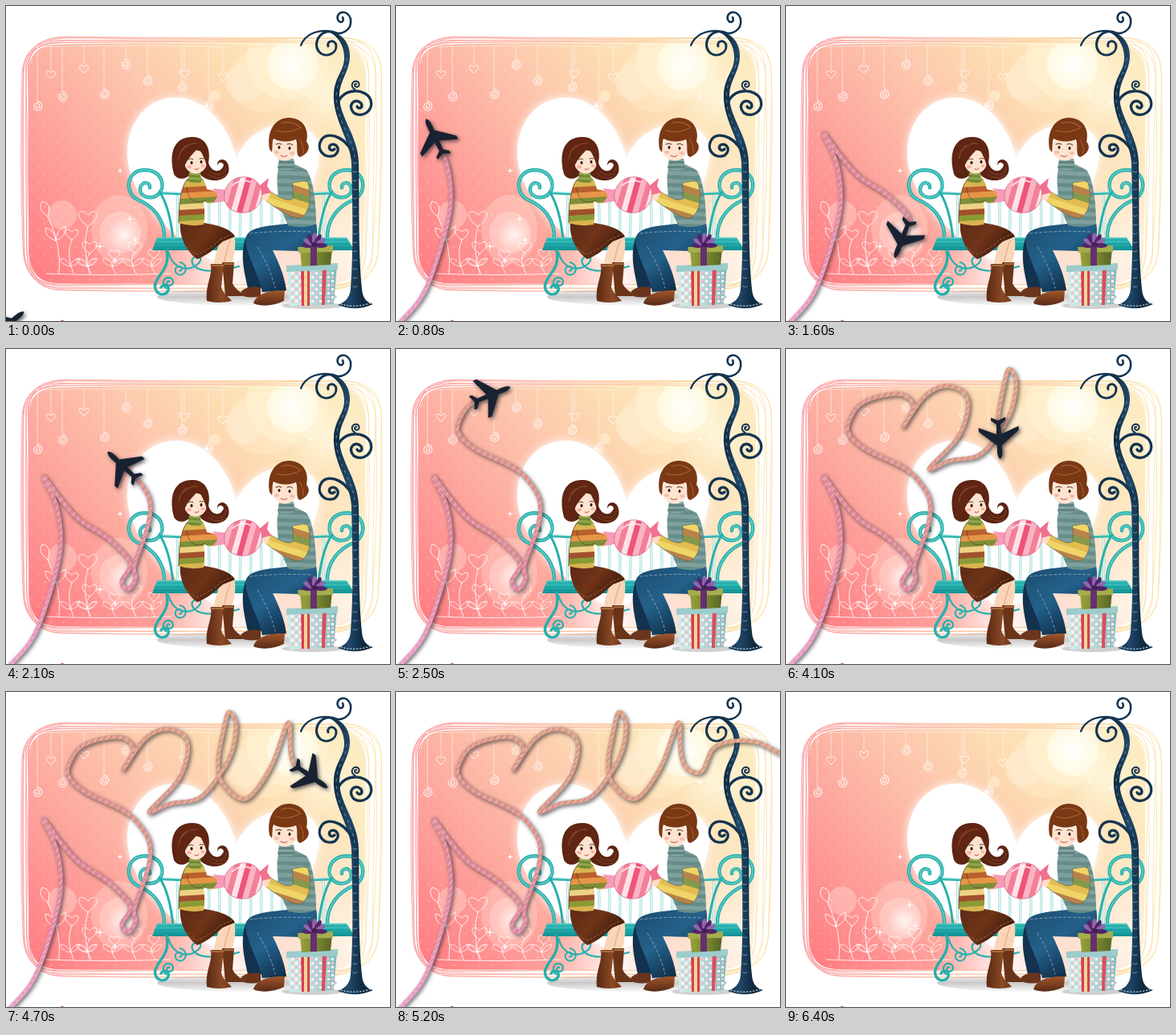
An HTML page with a canvas for the animation above (8.4 s loop, 478 by 392 pixels).

```html
<!DOCTYPE html>
<html lang="en">
<head>
<meta charset="utf-8">
<title>Bench and plane</title>
<style>
html, body { margin: 0; width: 100%; height: 100%; overflow: hidden; background: #fff; }
canvas { display: block; width: 478px; height: 392px; }
</style>
</head>
<body>
<canvas id="stage" width="478" height="392"></canvas>
<script>
const W = 478, H = 392, LOOP = 8400, STEP = 100;
const view = document.getElementById('stage').getContext('2d');
const scene = document.createElement('canvas');
const rope = document.createElement('canvas');
scene.width = rope.width = W;
scene.height = rope.height = H;
let c = scene.getContext('2d');

function fill(d, color) {
  c.fillStyle = color;
  c.fill(new Path2D(d));
}
function line(d, color, w = 1, dash = []) {
  c.strokeStyle = color;
  c.lineWidth = w;
  c.lineCap = c.lineJoin = 'round';
  c.setLineDash(dash);
  c.stroke(new Path2D(d));
  c.setLineDash([]);
}
function oval(x, y, rx, ry, color, rot = 0) {
  c.fillStyle = color;
  c.beginPath();
  c.ellipse(x, y, rx, ry, rot, 0, Math.PI * 2);
  c.fill();
}
function glow(x, y, r, inner, outer) {
  const g = c.createRadialGradient(x, y, 0, x, y, r);
  g.addColorStop(0, inner);
  g.addColorStop(1, outer);
  oval(x, y, r, r, g);
}
function ramp(x0, y0, x1, y1, colors) {
  const g = c.createLinearGradient(x0, y0, x1, y1);
  colors.forEach((k, i) => g.addColorStop(i / (colors.length - 1), k));
  return g;
}
// Spiral from the rim at angle a inward; dir sets the sense.
function spiral(x, y, r, a, turns, dir, color, w) {
  let d = '';
  for (let i = 0; i <= 40; i++) {
    const k = i / 40, q = a + dir * k * turns * Math.PI * 2, s = r * (1 - 0.85 * k);
    d += (i ? 'L' : 'M') + (x + s * Math.cos(q)) + ',' + (y + s * Math.sin(q));
  }
  line(d, color, w);
}
function heart(x, y, s, color) {
  line(`M${x},${y + s} C${x - s * 2},${y - s * .3} ${x - s},${y - s * 1.5} ${x},${y - s * .4}
    C${x + s},${y - s * 1.5} ${x + s * 2},${y - s * .3} ${x},${y + s}`, color, 1);
}
function clipTo(d, draw) {
  c.save();
  c.clip(new Path2D(d));
  draw();
  c.restore();
}
function bands(d, colors, x, y, angle, size) {
  clipTo(d, () => {
    c.translate(x, y);
    c.rotate(angle);
    for (let i = 0; i < 16; i++) {
      c.fillStyle = colors[i % colors.length];
      c.fillRect(-60, i * size, 120, size + .5);
    }
  });
}

const panel = 'M62,48 C150,45 310,47 412,47 C438,50 447,66 447,92 C446,170 449,240 444,305 C440,335 428,345 400,345 C300,347 160,346 64,345 C40,344 30,332 29,306 C27,230 27,160 28,82 C29,60 40,49 62,48Z';

function drawPanel() {
  c.fillStyle = '#fff';
  c.fillRect(0, 0, W, H);
  const edge = ramp(20, 0, 460, 0, ['#fb8f94', '#fcb09c', '#fbc98e', '#fbe0a0']);
  for (let i = 0; i < 7; i++) {
    const j = n => Math.sin(i * 2.7 + n * 1.9) * 4;
    const l = 24 + j(1), r = 458 + 2.6 * j(2), t = 42 + j(3), b = 350 + j(4);
    line(`M${l + 45},${t} Q250,${t + j(5)} ${r - 42},${t + 1} Q${r},${t + 3} ${r},${t + 45}
      Q${r + j(6)},200 ${r - 4},${b - 42} Q${r - 8},${b} ${r - 54},${b}
      Q230,${b + j(7)} ${l + 44},${b} Q${l + 2},${b} ${l + 1},${b - 45}
      Q${l + j(8)},190 ${l},${t + 40} Q${l},${t + 2} ${l + 45},${t}`, edge, .8);
  }
  fill(panel, ramp(50, 340, 370, 70, ['#ff7f84', '#fe9896', '#fdb0a2', '#fdc8ad', '#fddcb2', '#fdebc2']));
  clipTo(panel, () => {
    for (let y = 50, n = 0; y < 345; y += 10, n++)
      for (let x = 32 + n % 2 * 8; x < 300; x += 16) oval(x, y, 1.5, 1.5, 'rgba(255,225,205,.22)');
    glow(430, 320, 150, 'rgba(255,255,250,.75)', 'rgba(255,255,250,0)');
    glow(280, 345, 95, 'rgba(255,255,255,.9)', 'rgba(255,255,255,0)');
    oval(350, 66, 51, 51, 'rgba(255,246,214,.5)');
    oval(322, 92, 45, 40, 'rgba(255,246,220,.25)');
    oval(296, 95, 23, 23, 'rgba(255,240,215,.5)');
    oval(260, 112, 7, 7, 'rgba(255,245,215,.55)');
    oval(357, 73, 32, 32, 'rgba(255,255,240,.5)');
    glow(357, 73, 33, 'rgba(255,255,255,1)', 'rgba(255,255,245,.1)');
    glow(395, 110, 45, 'rgba(255,255,240,.5)', 'rgba(255,255,240,0)');
  });
  c.save();
  c.shadowColor = '#fff';
  c.shadowBlur = 12;
  fill('M287,190 C276,145 246,114 211,114 C172,115 150,148 151,186 C154,238 205,289 272,325 C330,300 386,245 390,184 C391,158 370,146 348,147 C318,149 296,166 287,190Z', '#fff');
  c.restore();
}

function drawOrnaments() {
  const white = 'rgba(255,255,255,.85)';
  line('M35,51 Q150,48 275,51', 'rgba(255,255,255,.5)', .8);
  const hung = [[39, 125, 0], [56, 85, 1], [70, 113, 0], [97, 78, 1], [122, 110, 0], [149, 73, 0],
    [176, 93, 0], [222, 84, 1], [219, 101, 0], [252, 124, 0], [270, 88, 1]];
  for (const [x, y, kind] of hung) {
    line(`M${x},50 L${x},${y - 5}`, 'rgba(255,255,255,.6)', .9);
    if (kind) heart(x, y, 5, white);
    else spiral(x, y, 6.5, -Math.PI / 2, 2, 1, white, 1.1);
  }
  oval(70, 260, 18, 18, 'rgba(255,225,215,.38)');
  oval(141, 278, 35, 43, 'rgba(255,235,225,.28)');
  oval(142, 282, 26, 26, 'rgba(255,240,230,.3)');
  glow(147, 285, 22, 'rgba(255,255,255,.8)', 'rgba(255,255,255,0)');
  line('M50,333 Q120,336 205,333', white, 1);
  for (const [x, y, s] of [[82, 284, 7], [102, 264, 10], [104, 300, 8], [135, 309, 6], [160, 300, 7], [184, 308, 6]]) {
    line(`M${x},${y + s} Q${x - 8},${(y + 333) / 2} ${x + 2},333`, white, 1);
    heart(x, y, s, white);
    line(`M${x - 2},324 q-13,-2 -12,-10 q10,1 12,10 q10,-2 12,-10 q-9,0 -12,10`, white, .8);
  }
  line('M66,333 Q70,300 52,262 M62,292 q-14,-4 -13,-16 q12,2 13,16 q14,-6 12,-18 q-11,4 -12,18', white, 1);
  oval(49, 250, 0, 0, white);
  line('M52,262 q-14,-9 -7,-19 q13,2 7,19', white, 1);
  for (const [x, y, s] of [[117, 299, 5], [154, 265, 4], [136, 317, 3], [142, 205, 3], [161, 291, 4], [250, 124, 4], [405, 120, 4], [378, 112, 3]]) {
    line(`M${x - s},${y} h${s * 2} M${x},${y - s} v${s * 2}`, '#fff', .8);
    oval(x, y, 1.5, 1.5, '#fff');
  }
}

const TEAL = '#25b0ac', AQUA = '#62cbc5';
function drawArm() {
  const d = 'M197,292 C199,264 181,248 164,241 C147,233 149,205 172,204 C193,204 200,223 190,234 C181,242 166,238 167,227 C169,217 180,219 179,226';
  line(d, TEAL, 4.5);
  line(d, AQUA, 1.6);
  line('M191,231 C201,246 206,270 208,291', TEAL, 3);
}
function drawBench() {
  const shadow = ramp(0, 350, 0, 374, ['rgba(150,145,145,0)', 'rgba(150,145,145,.5)', 'rgba(150,145,145,0)']);
  oval(300, 362, 112, 11, shadow);
  for (let x = 213; x < 405; x += 13) {
    line(`M${x},236 Q${x + 2},264 ${x},289`, '#8fd6d2', 3);
    line(`M${x},236 Q${x + 2},264 ${x},289`, '#f4fcfb', 1.4);
  }
  line('M192,233 C225,232 245,239 299,236 C350,239 376,232 405,233', TEAL, 3);
  line('M194,232 C225,231 245,238 299,235 C350,238 376,231 404,232', '#92ddd7', 1.2);
  drawArm();
  c.save();
  c.translate(597, 0);
  c.scale(-1, 1);
  drawArm();
  c.restore();
  fill('M188,288 L424,288 L434,304 L182,304Z', ramp(0, 288, 0, 304, ['#4cc9c3', '#22b0ac', '#128f94']));
  line('M188,291 H424 M185,296 H428 M184,300 H430', '#188f96', .9);
  line('M200,304 C204,324 193,331 188,341 C181,353 191,363 200,357 C207,350 197,343 193,350', TEAL, 3.5);
  line('M202,306 C207,326 226,333 240,320 C249,309 228,309 232,320 C238,333 265,331 290,324', TEAL, 2.2);
  spiral(216, 328, 9, -1.5, 1.5, 1, TEAL, 2);
  spiral(203, 344, 8, 2, 1.5, 1, TEAL, 2.2);
}

const KNIT = ['#8a9a35', '#d9b44f', '#b9602d', '#e69646', '#7e8f38', '#efd185', '#a1502d'];
function drawGirl() {
  fill('M209,209 C201,178 213,162 233,163 C251,164 255,181 252,195 C256,208 268,208 271,198 C269,192 262,195 264,200 C260,191 272,187 276,196 C281,208 273,218 257,217 C246,216 241,209 238,205 L225,213 C219,217 211,214 209,209Z', '#5b2413');
  line('M254,206 C262,213 273,211 274,201 M251,209 C260,216 269,215 273,210', '#85452a', 1);
  fill('M258,323 C261,308 264,298 268,290 L284,284 C287,299 284,312 281,321Z', '#fbd5b8');
  line('M271,322 C273,310 276,300 279,292', '#d99b7c', .9);
  fill('M217,268 C215,287 224,305 238,315 C250,311 262,300 270,293 L285,287 C281,277 260,272 247,270Z', ramp(215, 275, 265, 316, ['#5d2a16', '#703418', '#3c1a0c']));
  line('M225,300 Q232,308 239,309 Q256,301 266,291 L281,284', '#a16c42', 1, [2, 3]);
  const boot = ramp(252, 0, 286, 0, ['#5f2d14', '#8a4a26', '#622d14']);
  fill('M269,319 L284,319 L282,345 C285,353 293,355 295,361 L273,361Z', '#6a3418');
  fill('M255,321 L271,321 L268,350 C270,358 277,362 281,367 Q265,371 250,367 C248,346 257,338 255,321Z', boot);
  line('M255,323 L271,323 M272,321 L283,321', '#a86c3f', 2);
  const body = 'M229,213 C218,219 215,245 215,270 Q229,275 246,272 C248,260 247,251 246,243 L254,246 L269,243 L268,232 L250,228 C248,219 245,214 242,213Z';
  bands(body, KNIT, 230, 211, -.06, 7);
  line('M225,226 C226,240 235,248 248,242', 'rgba(80,45,20,.55)', 1);
  line('M229,213 C218,219 215,245 215,270', '#694024', .8);
  bands('M228,207 L242,207 L243,219 Q234,222 227,218Z', ['#91a64a', '#718836'], 230, 207, .05, 3);
  oval(236, 194, 14, 14.5, '#fee4d0');
  fill('M211,206 C207,181 214,165 231,164 C247,162 254,177 250,200 C248,190 243,183 240,175 C234,184 223,190 220,208 L212,211Z', '#612613');
  line('M219,180 Q229,169 238,171 M215,190 Q218,176 225,173', '#93512f', 1);
  oval(231, 195, 1.6, 2.1, '#2b1713');
  oval(243, 194, 1.5, 2.1, '#2b1713');
  line('M227,191 q4,-2 6,0 M241,190 q3,-1 5,0', '#4c2519', .9);
  oval(228, 200, 3, 2, 'rgba(248,125,120,.5)');
  oval(245, 199, 2.5, 2, 'rgba(248,125,120,.5)');
  line('M235,203 q3,2 5,-1', '#c83c3b', 1);
  fill('M263,231 C270,228 279,233 280,237 C277,242 270,245 264,241Z', '#fee0cb');
}

function drawCandy() {
  fill('M278,229 L257,227 L264,236 L258,245 L279,242Z', '#f69ab5');
  fill('M313,226 L327,214 L325,224 L330,232 L315,236Z', '#f2708f');
  const body = 'M272,233 C275,215 294,208 309,216 C324,227 321,249 303,256 C286,261 269,251 272,233Z';
  bands(body, ['#f9b4c4', '#f37f98', '#ffe1e8', '#ee5578'], 272, 232, -1.3, 7);
  line(body, '#d8658a', .8);
  line('M282,223 Q293,214 304,219', 'rgba(255,255,255,.7)', 2);
}

function drawBoy() {
  fill('M298,289 C291,310 297,332 301,351 L325,351 L321,300Z', '#12324e');
  fill('M350,271 L386,270 C390,289 383,304 367,305 L332,304 C341,322 347,338 349,354 L319,356 C314,332 300,312 298,292 C298,274 326,274 350,271Z', ramp(300, 280, 350, 350, ['#1d5074', '#24618a', '#102f4b']));
  line('M304,283 Q340,279 380,281 M313,300 Q329,326 335,351', '#89a9bd', .9, [3, 3]);
  fill('M291,359 C293,351 304,348 317,350 L317,361 Q302,365 291,359Z', '#6b351d');
  fill('M308,370 C310,360 325,353 347,354 L346,367 C332,374 317,374 308,370Z', ramp(0, 354, 0, 372, ['#a1562b', '#5b2c18']));
  const torso = 'M341,199 C335,208 338,231 341,250 L351,273 Q370,278 386,271 C386,248 383,216 374,204 L358,196Z';
  bands(torso, ['#7fa09c', '#668d8a'], 360, 196, .04, 5);
  const sleeve = 'M357,220 L375,217 C382,238 378,258 366,264 C352,264 337,252 322,241 L328,230 C340,238 350,244 357,240Z';
  bands(sleeve, ['#f0d566', '#b9824a', '#86994b', '#e4bd50'], 357, 214, .3, 8);
  line(sleeve, 'rgba(70,80,50,.6)', .8);
  fill('M310,224 C318,222 327,228 329,235 L324,243 C317,240 309,234 308,229Z', '#fedec7');
  line('M311,226 l-7,-5 M310,230 l-7,-2 M312,235 l-6,0', '#fedec7', 2.6);
  bands('M340,191 L358,190 L360,202 Q349,207 338,202Z', ['#83a4a0', '#608380'], 348, 190, 0, 3);
  oval(347, 177, 15.5, 15.5, '#fee4d0');
  fill('M328,178 C324,154 336,139 352,139 C369,139 378,153 374,169 C379,174 378,183 366,188 C360,186 364,175 361,166 C350,170 340,169 333,165 C331,170 332,177 331,182Z', '#7a3814');
  line('M336,155 Q350,160 367,151 M343,146 Q354,142 366,150 M366,166 Q371,175 370,183', '#a6602f', 1.1);
  oval(340, 176, 1.5, 2.1, '#291713');
  oval(353, 177, 1.5, 2.1, '#291713');
  line('M336,172 q4,-2 7,0 M350,172 q4,-2 7,1', '#54291a', 1);
  oval(337, 182, 3, 2, 'rgba(246,130,115,.42)');
  oval(356, 183, 3, 2, 'rgba(246,130,115,.42)');
  line('M342,186 q5,3 8,0', '#b64038', 1);
}

function drawGifts() {
  oval(382, 373, 39, 4, 'rgba(120,120,125,.35)');
  fill('M350,325 L412,323 L408,371 L353,374Z', ramp(350, 0, 412, 0, ['#d2ecea', '#b8dedd', '#80babd']));
  for (let x = 355; x < 408; x += 5)
    for (let y = 331; y < 369; y += 5) {
      c.fillStyle = (x + y) % 2 ? '#f5b9c6' : '#f9fbf4';
      c.fillRect(x, y, 3, 3);
    }
  fill('M367,324 H378 V373 H368Z', '#d93f48');
  fill('M371,324 H375 V373 H371Z', '#f6d59a');
  fill('M394,324 L399,324 L397,372 L393,372Z', '#d94e5d');
  fill('M349,323 L413,320 L413,328 L349,331Z', '#9ccccb');
  fill('M366,304 L406,302 L404,322 L368,324Z', ramp(364, 0, 408, 0, ['#9aa33c', '#7b8830', '#546325']));
  fill('M363,300 L407,298 L407,306 L364,307Z', '#a5ad4d');
  fill('M379,300 H387 V323 H379Z', '#66306f');
  for (let i = 0; i < 7; i++) {
    const q = Math.PI + i * Math.PI / 6;
    oval(384 + 8 * Math.cos(q), 298 + 8 * Math.sin(q), 8, 3, i % 2 ? '#9165ad' : '#522469', q);
  }
  oval(384, 297, 4, 3, '#451f57');
}

function drawLamp() {
  const navy = '#143450';
  fill('M429,352 C433,300 431,240 430,195 C428,165 406,140 408,108 C410,86 422,80 421,62 C420,48 414,38 400,31 C418,32 429,47 428,64 C427,82 416,92 415,110 C414,138 438,160 439,195 C440,240 438,300 443,352 C444,364 449,369 457,371 Q435,381 413,372 C421,369 428,364 429,352Z', ramp(410, 0, 444, 0, ['#122d45', '#20486a', '#102a40']));
  line('M417,371 Q435,376 453,370', '#a6bac4', 1.5, [1, 3]);
  line('M367,49 C372,36 385,30 402,31', navy, 2.2);
  line('M412,34 C393,25 381,45 389,56 C396,66 412,60 411,49 C409,41 399,43 401,50', navy, 3);
  line('M404,32 C418,38 431,30 429,16 C425,3 410,7 413,17 C416,23 422,19 419,14', navy, 2.6);
  line('M413,122 C417,102 448,101 454,117 C458,130 444,140 433,133 C424,124 434,113 442,121 C445,127 439,129 437,125', navy, 3.4);
  line('M433,190 C428,165 402,154 393,166 C385,178 396,191 409,186 C419,178 409,168 403,174 C401,179 406,181 409,178', navy, 3.4);
  spiral(436, 98, 6, 1.8, 1.5, 1, navy, 2);
  for (let y = 195; y < 350; y += 11) line(`M432,${y} q3,2 5,0`, '#7f9dac', .9);
  line('M434,188 C431,162 411,142 411,112 C412,90 424,82 424,64', '#6f90a3', 1, [3, 6]);
}

drawPanel();
drawOrnaments();
drawBench();
drawGirl();
drawBoy();
drawCandy();
drawGifts();
drawLamp();
oval(70, 392, 2, 1.2, '#c66');

// The rope's course: a smooth curve through these points.
const route = [[-18, 412], [8, 390], [36, 354], [58, 292], [68, 243], [63, 196], [46, 158],
  [68, 187], [92, 213], [127, 236], [154, 266], [144, 289], [152, 299], [161, 286], [160, 268],
  [176, 222], [179, 191], [168, 168], [147, 148], [98, 124], [77, 103], [82, 82], [95, 67],
  [120, 58], [146, 57], [158, 72], [146, 96], [172, 59], [198, 46], [221, 54], [226, 76],
  [213, 111], [178, 149], [204, 139], [240, 132], [265, 104], [281, 74], [286, 40], [277, 25],
  [270, 50], [264, 86], [269, 113], [298, 133], [329, 94], [351, 38], [354, 74], [361, 94],
  [380, 99], [395, 70], [421, 61], [451, 63], [480, 77], [520, 92]];
// Time in ms against index along the route.
const cues = [[0, 0], [900, 6], [1600, 10], [2500, 22], [3400, 33], [4100, 40], [5200, route.length - 1]];
const FINE = 12;
const track = [], reach = [0];
for (let i = 0; i < route.length - 1; i++) {
  const p = [-1, 0, 1, 2].map(k => route[Math.max(0, Math.min(route.length - 1, i + k))]);
  for (let s = 0; s < FINE; s++) {
    const u = s / FINE;
    track.push([0, 1].map(a => p[1][a] + u * (p[2][a] - p[0][a]) / 2 +
      u * u * (p[0][a] - 2.5 * p[1][a] + 2 * p[2][a] - p[3][a] / 2) +
      u * u * u * (1.5 * (p[1][a] - p[2][a]) + (p[3][a] - p[0][a]) / 2)));
  }
}
track.push(route[route.length - 1]);
for (let i = 1; i < track.length; i++)
  reach.push(reach[i - 1] + Math.hypot(track[i][0] - track[i - 1][0], track[i][1] - track[i - 1][1]));

function pointAt(s) {
  s = Math.max(0, Math.min(reach[reach.length - 1], s));
  let i = 1;
  while (i < reach.length - 1 && reach[i] < s) i++;
  const u = (s - reach[i - 1]) / (reach[i] - reach[i - 1]);
  return [0, 1].map(a => track[i - 1][a] + u * (track[i][a] - track[i - 1][a]));
}
function distanceAt(t) {
  for (let i = 1; i < cues.length; i++) {
    const [t0, a] = cues[i - 1], [t1, b] = cues[i];
    if (t <= t1) return reach[a * FINE] + (t - t0) / (t1 - t0) * (reach[b * FINE] - reach[a * FINE]);
  }
  return reach[reach.length - 1];
}

function drawRope(dist) {
  c = rope.getContext('2d');
  c.clearRect(0, 0, W, H);
  let d = 'M' + track[0];
  for (let i = 1; i < track.length && reach[i] < dist; i++) d += 'L' + track[i];
  d += 'L' + pointAt(dist);
  c.save();
  c.shadowColor = 'rgba(50,45,50,.75)';
  c.shadowBlur = 5;
  c.shadowOffsetX = 2;
  c.shadowOffsetY = 2;
  line(d, ramp(20, 380, 280, 60, ['#eca4cd', '#e58aa8', '#db9a8e', '#dca688']), 5.2);
  c.restore();
  for (let s = 2; s < dist; s += 4) {
    const [x, y] = pointAt(s);
    line(`M${x - 1.5},${y + 2} l3,-4`, s % 8 < 4 ? 'rgba(255,211,190,.7)' : 'rgba(190,105,135,.5)', 1);
  }
}

// The tail sits at the origin, where the rope is tied on.
const hull = new Path2D('M51,0 C49,-3.5 42,-3.5 34,-3 L16,-25 L11,-25 L20,-3 L8,-2.5 L3,-9 L-1,-9 L3,0 L-1,9 L3,9 L8,2.5 L20,3 L11,25 L16,25 L34,3 C42,3.5 49,3.5 51,0Z');
function drawPlane(dist) {
  const [x, y] = pointAt(dist), [ax, ay] = pointAt(dist + 18);
  view.save();
  view.translate(x, y);
  view.rotate(Math.atan2(ay - y, ax - x));
  view.shadowColor = 'rgba(35,35,40,.75)';
  view.shadowBlur = 5;
  view.shadowOffsetX = 2;
  view.shadowOffsetY = 2;
  view.fillStyle = '#192231';
  view.fill(hull);
  view.restore();
}

let shown = -1;
function tick(now) {
  const t = Math.floor(now % LOOP / STEP) * STEP;
  if (t !== shown) {
    shown = t;
    view.drawImage(scene, 0, 0);
    const fade = t < 6200 ? 1 : Math.max(0, (6400 - t) / 300);
    if (fade > 0) {
      const dist = distanceAt(t);
      drawRope(dist);
      view.globalAlpha = fade;
      view.drawImage(rope, 0, 0);
      view.globalAlpha = 1;
      if (t < 5200) drawPlane(dist);
    }
  }
  requestAnimationFrame(tick);
}
const start = performance.now();
requestAnimationFrame(now => tick(Math.max(0, now - start)));
</script>
</body>
</html>
```
